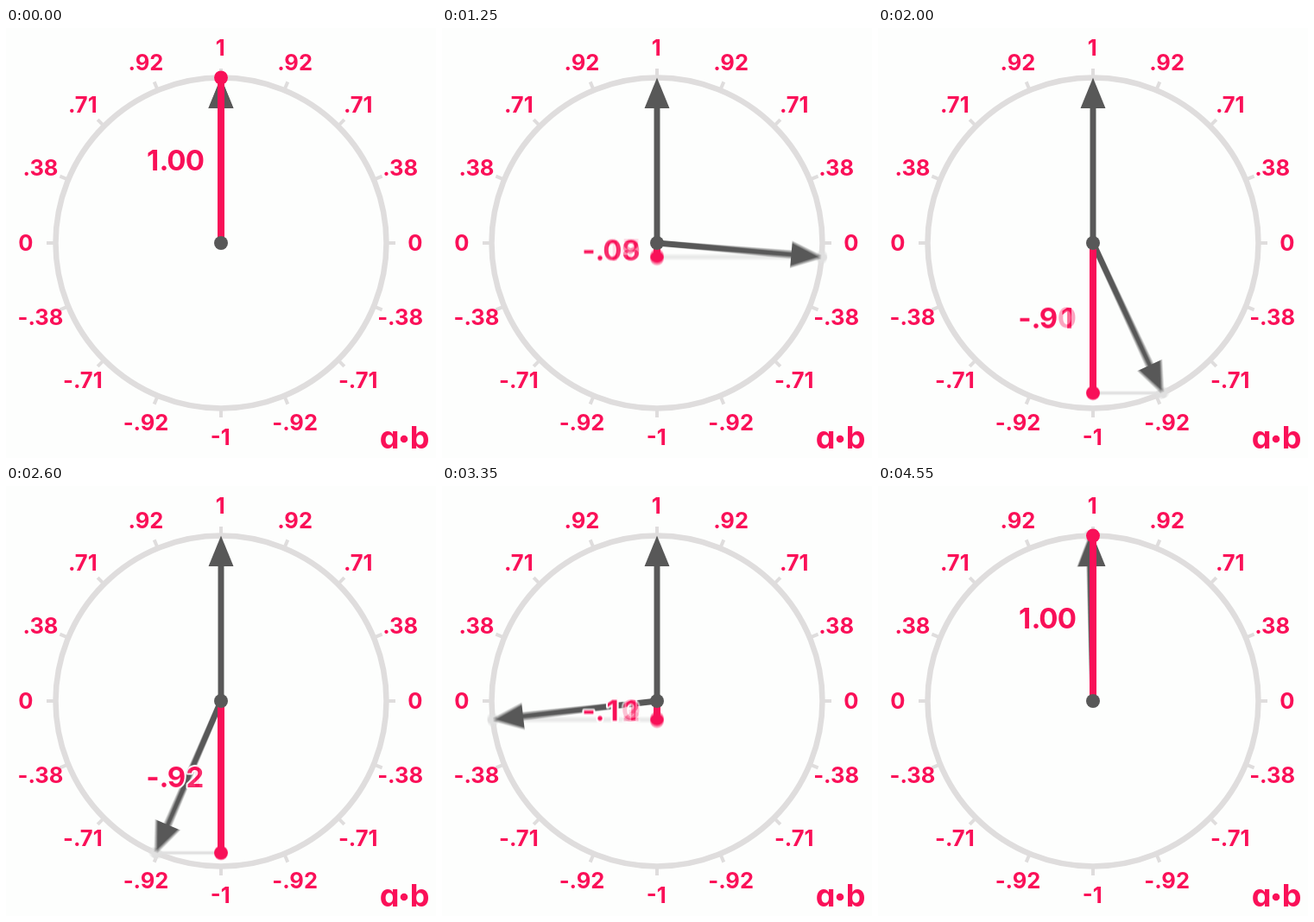
Animation of 498 by 498 pixels, one loop 4600 ms. Source, as an HTML page with a canvas:

```html
<!DOCTYPE html>
<html lang="en">
<head>
<meta charset="utf-8">
<title>Dot product of unit vectors</title>
<style>
  html, body { margin: 0; width: 100%; height: 100%; overflow: hidden; background: #fdfefd; }
  svg, canvas { position: absolute; left: 0; top: 0; width: 498px; height: 498px; }
  text { font: 700 25.5px Inter, sans-serif; fill: #fa1058; text-anchor: middle; }
  .name { font: 700 36px Inter, "Noto Sans", sans-serif; }
</style>
</head>
<body>
<svg viewBox="0 0 498 498">
  <g id="dial" fill="none" stroke="#dfdddd">
    <circle cx="249" cy="249" r="191.5" stroke-width="6.5"/>
  </g>
  <g id="labels"></g>
  <text class="name" x="444 479" y="487">ɑb</text>
  <circle cx="461" cy="476" r="4.3" fill="#fa1058"/>
</svg>
<canvas id="stage" width="498" height="498"></canvas>
<script>
const SIZE = 498, C = 249, R = 191.5;
const LOOP = 4600, STEP = 50, RAMP = 117;
const SHUTTER = 20, SAMPLES = 8;
const PINK = '#f81058', DARK = '#585858', PALE = '#e0e0e0', PAPER = '#fdfefd';

const polar = (angle, r) => [C + r * Math.sin(angle), C - r * Math.cos(angle)];

function format(value) {
  const s = value.toFixed(2);
  return Number(s) === 0 ? '.00' : s.replace(/^(-?)0\./, '$1.');
}

function addSvg(parent, tag, attrs, text = '') {
  const el = document.createElementNS('http://www.w3.org/2000/svg', tag);
  for (const key in attrs) el.setAttribute(key, attrs[key]);
  el.textContent = text;
  parent.append(el);
}

function buildDial() {
  const dial = document.getElementById('dial');
  const labels = document.getElementById('labels');
  for (let i = 0; i < 16; i++) {
    const angle = i * Math.PI / 8;
    const [x1, y1] = polar(angle, R);
    const [x2, y2] = polar(angle, 202);
    addSvg(dial, 'line', { x1, y1, x2, y2, 'stroke-width': 4 });
    const [x, y] = polar(angle, 225.5);
    const text = i % 4 ? format(Math.cos(angle)) : String(Math.round(Math.cos(angle)) || 0);
    addSvg(labels, 'text', { x: x - 0.7, y: y + 8.6 }, text);
  }
}

// Constant speed with a short ramp at both ends of the loop.
function angleAt(time) {
  const t = (time + LOOP) % LOOP;
  const speed = 2 * Math.PI / (LOOP - RAMP);
  if (t < RAMP) return speed * t * t / (2 * RAMP);
  if (t > LOOP - RAMP) return 2 * Math.PI - speed * (LOOP - t) ** 2 / (2 * RAMP);
  return speed * (t - RAMP / 2);
}

const out = document.getElementById('stage').getContext('2d');
const layer = document.createElement('canvas');
layer.width = layer.height = SIZE;
const ctx = layer.getContext('2d');

function line(x1, y1, x2, y2, width, color) {
  ctx.beginPath();
  ctx.moveTo(x1, y1);
  ctx.lineTo(x2, y2);
  ctx.lineWidth = width;
  ctx.strokeStyle = color;
  ctx.stroke();
}

function dot(x, y, r, color) {
  ctx.beginPath();
  ctx.arc(x, y, r, 0, 2 * Math.PI);
  ctx.fillStyle = color;
  ctx.fill();
}

function arrow(angle) {
  ctx.save();
  ctx.translate(C, C);
  ctx.rotate(angle);
  line(0, 0, 0, -160, 7, DARK);
  ctx.beginPath();
  ctx.moveTo(0, -R);
  ctx.lineTo(14.5, -156);
  ctx.lineTo(-14.5, -156);
  ctx.fillStyle = DARK;
  ctx.fill();
  ctx.restore();
}

// Sign (or unit), point and two digits each keep a fixed slot.
function drawValue(value, y) {
  const slots = [170, 183, 197.5, 219];
  const chars = [...format(value).padStart(4)];
  ctx.font = '700 33px Inter, sans-serif';
  ctx.textAlign = 'center';
  ctx.lineJoin = 'round';
  ctx.lineWidth = 4;
  ctx.strokeStyle = PAPER;
  ctx.fillStyle = PINK;
  chars.forEach((ch, i) => ctx.strokeText(ch, slots[i], y));
  chars.forEach((ch, i) => ctx.fillText(ch, slots[i], y));
}

function drawScene(angle) {
  const [x, y] = polar(angle, R);
  ctx.clearRect(0, 0, SIZE, SIZE);
  line(C, y, x, y, 3.5, PALE);
  dot(x, y, 6.5, PALE);
  arrow(angle);
  arrow(0);
  line(C, C, C, y, 8, PINK);
  dot(C, y, 8, PINK);
  dot(C, C, 8, DARK);
  drawValue(Math.cos(angle), (C + y) / 2 + 12);
}

// Averages several moments leading up to the given time as motion blur.
function render(time) {
  out.clearRect(0, 0, SIZE, SIZE);
  out.globalCompositeOperation = 'lighter';
  out.globalAlpha = 1 / SAMPLES;
  for (let i = 0; i < SAMPLES; i++) {
    drawScene(angleAt(time - SHUTTER * (i + 0.5) / SAMPLES));
    out.drawImage(layer, 0, 0);
  }
}

const start = performance.now();
let shown = -1;

function tick() {
  const elapsed = performance.now() - start + 3;
  const step = Math.floor((elapsed % LOOP) / STEP);
  if (step !== shown) {
    shown = step;
    render(step * STEP);
  }
  requestAnimationFrame(tick);
}

buildDial();
tick();
</script>
</body>
</html>
```
